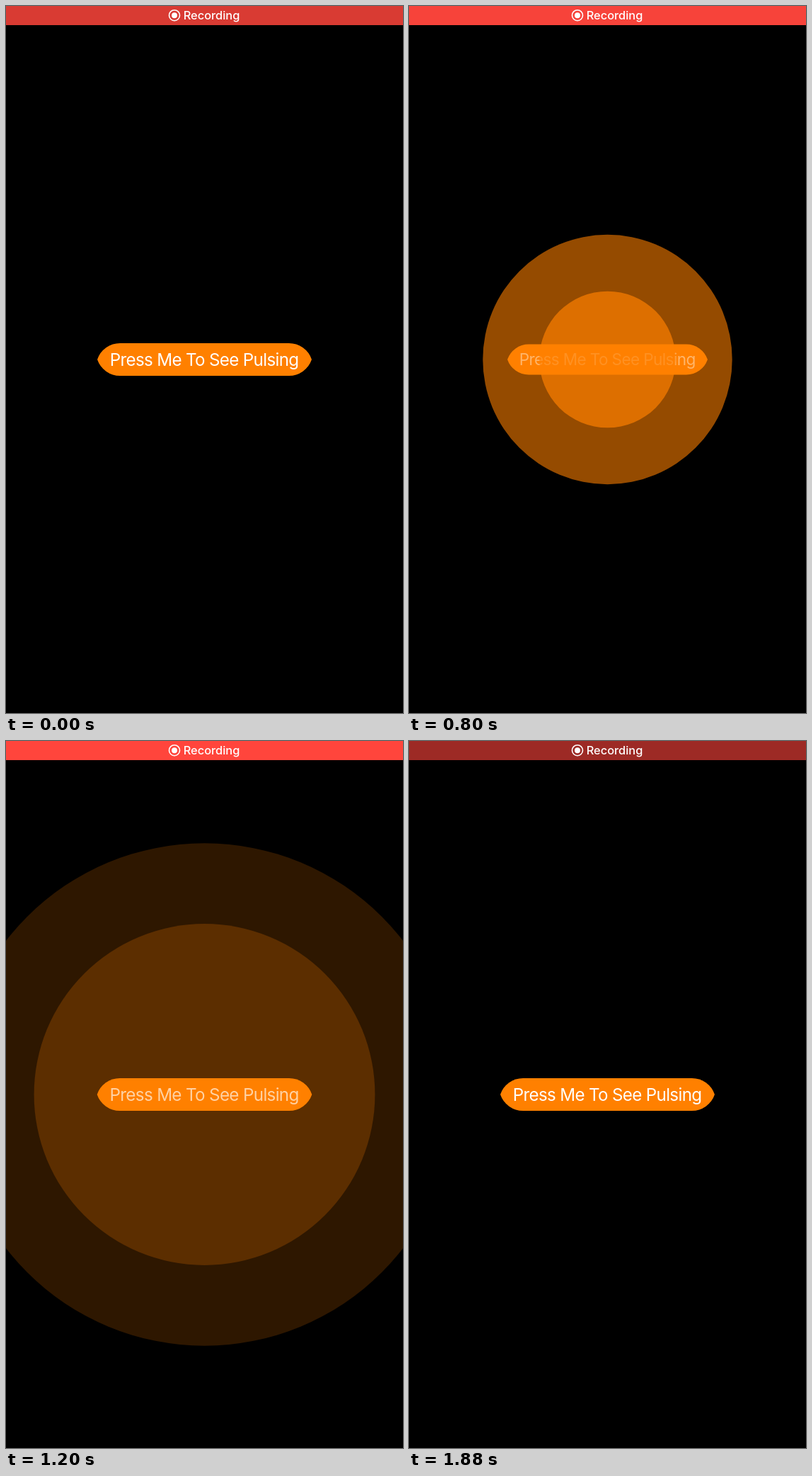
An HTML page with a canvas that plays this animation: 561 px wide and 998 px high, repeating every 1.92 s.

```html
<!DOCTYPE html>
<html lang="en">
<head>
<meta charset="utf-8">
<title>Pulsing button</title>
<style>
  html, body { margin: 0; width: 100%; height: 100%; overflow: hidden; background: #000; }
  canvas { display: block; }
</style>
</head>
<body>
<canvas id="stage" width="561" height="998"></canvas>
<script>
const ctx = document.getElementById('stage').getContext('2d');
const LOOP = 1920, STEP = 40;
const CX = 280.5, CY = 499;
const ORANGE = '#ff8000';
const RELEASE = 447;
const PULSE_MS = 1388;

// y of a CSS-style cubic Bezier at progress x
function bezier(x1, y1, x2, y2) {
  const at = (a, b, s) => 3 * a * s * (1 - s) ** 2 + 3 * b * s * s * (1 - s) + s ** 3;
  return x => {
    if (x <= 0) return 0;
    if (x >= 1) return 1;
    let lo = 0, hi = 1;
    for (let i = 0; i < 30; i++) {
      const mid = (lo + hi) / 2;
      if (at(x1, x2, mid) < x) lo = mid; else hi = mid;
    }
    return at(y1, y2, lo);
  };
}
const ease = bezier(0.25, 0.1, 0.25, 1);
const easeInOut = bezier(0.42, 0, 0.58, 1);

// Grows while pressed, springs back on release
function buttonScale(t) {
  if (t < RELEASE) return 1 + 0.4 * easeInOut(t / 440);
  const d = t - RELEASE, w = 0.01067, k = 0.504;
  return 1 + 0.4 * Math.exp(-k * w * d) * (Math.cos(w * d) + k * Math.sin(w * d));
}

function barLevel(t) {
  if (t < 440) return 0.85 + 0.017 * t / 440;
  if (t < 1000) return 0.867 + 0.133 * Math.sin((t - 440) / 560 * Math.PI / 2) ** 1.6;
  if (t < 1640) return 1;
  return 1 - 0.385 * ((t - 1640) / 240) ** 2;
}

function disc(x, y, r) {
  ctx.beginPath();
  ctx.arc(x, y, r, 0, Math.PI * 2);
}

function drawBar(t) {
  const v = barLevel(t);
  ctx.fillStyle = `rgb(${255 * v}, ${69 * v}, ${60 * v})`;
  ctx.fillRect(0, 0, 561, 27);
  ctx.strokeStyle = ctx.fillStyle = '#fff';
  ctx.lineWidth = 1.6;
  disc(238, 13.2, 7.5);
  ctx.stroke();
  disc(238, 13.2, 4);
  ctx.fill();
  ctx.font = '500 16.4px Inter, sans-serif';
  ctx.letterSpacing = '0px';
  ctx.textAlign = 'left';
  ctx.fillText('Recording', 250.7, 19);
}

function drawButton(t) {
  const s = buttonScale(t), P = Math.PI;
  const halfW = 153.3, halfH = 23, r = 34;
  const x = halfW - r, y = r - halfH, tip = Math.asin(y / r);
  ctx.save();
  ctx.translate(CX, CY);
  ctx.scale(s, s);
  ctx.beginPath();
  ctx.arc(-x, y, r, P + tip, 1.5 * P);
  ctx.arc(x, y, r, 1.5 * P, 2 * P - tip);
  ctx.arc(x, -y, r, tip, P / 2);
  ctx.arc(-x, -y, r, P / 2, P - tip);
  ctx.closePath();
  ctx.fillStyle = ORANGE;
  ctx.fill();
  ctx.fillStyle = '#fff';
  ctx.font = '400 24.2px Inter, sans-serif';
  ctx.letterSpacing = '-0.68px';
  ctx.textAlign = 'center';
  ctx.fillText('Press Me To See Pulsing', -0.4, 8.8);
  ctx.restore();
}

function drawPulse(t, start, radius, maxAlpha) {
  const p = (t - start) / PULSE_MS;
  if (p <= 0 || p >= 1) return;
  const e = ease(p);
  ctx.globalAlpha = Math.min(maxAlpha, (1 - e) * (1 + 0.3 * e ** 5));
  ctx.fillStyle = ORANGE;
  disc(CX, CY, radius * e);
  ctx.fill();
  ctx.globalAlpha = 1;
}

function draw(t) {
  ctx.fillStyle = '#000';
  ctx.fillRect(0, 0, 561, 998);
  drawButton(t);
  drawPulse(t, RELEASE, 421.5, 1);
  drawPulse(t, RELEASE + 60, 300.5, 0.75);
  drawBar(t);
}

const begin = performance.now();
function tick() {
  const t = (performance.now() - begin) % LOOP;
  draw(Math.floor(t / STEP) * STEP);
  requestAnimationFrame(tick);
}
tick();
</script>
</body>
</html>
```
